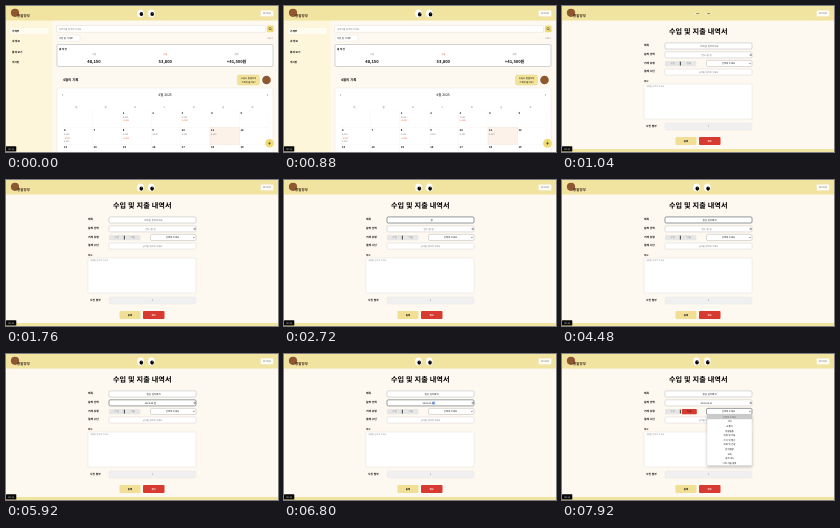
An HTML page that plays this animation: 272x146 px, repeating every 8 s.

```html
<!DOCTYPE html>
<html lang="ko">
<head>
<meta charset="utf-8">
<title>가계부</title>
<style>
html, body { margin: 0; width: 100%; height: 100%; overflow: hidden; background: #fdf8f0; }
svg { display: block; width: 100vw; height: 100vh; }
text { font-family: "Noto Sans CJK KR", "Noto Sans CJK", "Noto Sans", sans-serif; text-rendering: geometricPrecision; }
</style>
</head>
<body>
<svg id="stage" viewBox="0 0 272 146" preserveAspectRatio="none"></svg>
<script>
const LOOP = 8000;
const FORM_AT = 960;
const INK = '#0c0c0c', YELLOW = '#f1e3a0', RED = '#d63a30', LINE = '#c4c4c4', PALE = '#929292', COOKIE = '#8d5732';

const rect = (x, y, w, h, fill, stroke = 'none', r = 0, sw = 0.4) =>
  `<rect x="${x}" y="${y}" width="${w}" height="${h}" rx="${r}" fill="${fill}" stroke="${stroke}" stroke-width="${sw}"/>`;
const ellipse = (x, y, rx, ry, fill) => `<ellipse cx="${x}" cy="${y}" rx="${rx}" ry="${ry}" fill="${fill}"/>`;
const circle = (x, y, r, fill) => ellipse(x, y, r, r, fill);
// y is the vertical middle of the text
const label = (x, y, str, size, fill = INK, anchor = 'start', weight = 400, id = '') =>
  `<text ${id && `id="${id}"`} x="${x}" y="${y + size * 0.36}" font-size="${size}" fill="${fill}" text-anchor="${anchor}" font-weight="${weight}">${str}</text>`;
const mid = (x, y, str, size, fill, weight, id) => label(x, y, str, size, fill, 'middle', weight, id);
const path = (d, stroke = INK, sw = 0.4) => `<path d="${d}" fill="none" stroke="${stroke}" stroke-width="${sw}"/>`;
const during = (from, to, body) => `<g data-from="${from}" data-to="${to}">${body}</g>`;

function header() {
  const eye = x => `<g class="eye" data-x="${x}">${ellipse(0, 0, 3.3, 3.9, '#fff')}<g class="pupil">${ellipse(0, 0, 1.8, 2.1, '#000')}${circle(0.5, -0.8, 0.4, '#fff')}</g></g>`;
  return rect(0, 0, 272, 14.5, YELLOW)
    + circle(9, 6.8, 4.1, COOKIE) + label(11, 10, '콩알장부', 3.5, '#39251a', 'start', 900)
    + eye(134.5) + eye(145.3)
    + rect(254.5, 4.3, 13, 6.2, '#fffdf6', '#e7dcae', 1.2, 0.3) + mid(261, 7.4, '로그아웃', 2.2, '#444');
}

function calendar() {
  const left = 57, step = 29.4, top = 104, rowH = 17.3;
  const entries = { 1: 2, 3: 2, 6: 3, 8: 2, 9: 1, 10: 1, 11: 1 };
  let out = rect(51, 82, 216, 68, '#fff', '#e4dfd2', 2)
    + mid(159, 88.3, '4월 2025', 3.4, INK, 500)
    + label(56, 88.3, '‹', 4) + label(261, 88.3, '›', 4);
  [...'일월화수목금토'].forEach((day, i) => out += mid(left + step * (i + 0.45), 100.8, day, 2.3, '#777'));
  for (let cell = 0; cell < 21; cell++) {
    const x = left + cell % 7 * step, y = top + Math.floor(cell / 7) * rowH, date = cell - 1;
    const today = date === 11;
    out += rect(x, y, step, rowH, today ? '#fdf2e9' : 'none', today ? '#d9cfc6' : '#f5f3f0', 0, 0.25);
    if (date < 1) continue;
    out += label(x + 1, y + 2.8, date, 2.7, INK, 'start', 700);
    for (let i = 0; i < (entries[date] || 0); i++)
      out += label(x + 1, y + 7 + i * 3.5, i === 1 ? '-8,500' : '4,200', 2.2, i === 1 ? '#e0603c' : '#777');
  }
  return out;
}

function dashboard() {
  const menu = ['가계부', '내 정보', '통계 보기', '게시판'];
  const totals = [['수입', '48,150', '#777'], ['지출', '53,800', '#e0673c'], ['합계', '+41,500원', '#777']];
  return rect(0, 14, 46.5, 132, '#fef6da')
    + rect(4, 21.5, 39, 7, '#fffcf0', '#f3ead0', 1, 0.3)
    + menu.map((name, i) => label(6, 25 + i * 10.3, name, 2.6, INK, 'start', 800)).join('')
    + rect(50.5, 19.5, 209, 6.8, '#fff', '#d8d5cc', 1.2) + label(53, 22.7, '검색어를 입력해 주세요', 2.3, '#777')
    + rect(261, 19.5, 6.6, 6.8, '#f0d976', 'none', 1.2)
    + `<circle cx="264" cy="22.6" r="1.1" fill="none" stroke="#222" stroke-width=".4"/>` + path('M264.8 23.4l1.2 1.2')
    + rect(51, 29, 23, 6.2, '#fff', '#e6e1d6', 1) + label(53, 32.1, '이번 달 가계부', 2.3, INK, 'start', 500)
    + label(267, 32.1, '더보기', 2, '#777', 'end')
    + rect(51, 38.5, 216, 22, '#fff', '#8f949b', 1.4) + label(53, 43, '총 자산', 2.6, INK, 'start', 800)
    + totals.map(([name, sum, color], i) => mid(88 + i * 71.3, 48.5, name, 2.3, color) + mid(88 + i * 71.3, 55.2, sum, 4.1, INK, 700)).join('')
    + label(57, 73.7, '4월의 기록', 3.4, INK, 'start', 700)
    + rect(231.5, 69, 22, 10, '#f4e49a', '#e0cd78', 2)
    + mid(242.5, 72.3, '오늘도 알뜰하게', 2.3, INK, 500) + mid(242.5, 75.8, '기록해 볼까요?', 2.3, INK, 500)
    + circle(260.5, 74, 4.3, COOKIE)
    + calendar()
    + `<g id="add">${circle(0, 0, 4.2, '#f1da72')}${path('M-1.4 0h2.8M0-1.4v2.8', '#222', 0.5)}</g>`;
}

function dropdown() {
  const items = ['선택해 주세요', '식비', '교통비', '생활용품', '의류 및 미용', '주거 및 통신', '의료 및 건강', '문화생활', '교육', '경조사비', '기타 지출 항목'];
  return `<g filter="url(#shade)">${rect(145, 60.5, 45, 50.8, '#fff', '#bbb', 0, 0.3)}</g>`
    + rect(145, 60.5, 45, 4.7, '#c9c9c9')
    + items.map((name, i) => mid(167.5, 62.9 + i * 4.6, name, 2.3, i ? INK : '#666')).join('');
}

function form() {
  const names = [['제목', 39], ['날짜 선택', 48], ['거래 유형', 57], ['결제 수단', 65.5]];
  const field = (x, y, w, border = LINE) => rect(x, y, w, 6.1, '#fff', border, 1.3, 0.35);
  const focus = (x, y, w) => rect(x, y, w, 6.1, 'none', '#4c5a64', 1.3, 0.45);
  const kind = (x, name, fill, ink) => rect(x, 55, 15, 5.2, fill, 'none', 0.8) + mid(x + 7.5, 57.6, name, 2.4, ink);
  return mid(136.2, 25.5, '수입 및 지출 내역서', 7.15, '#000', 700)
    + names.map(([name, y]) => label(82, y, name, 2.7, INK, 'start', 900)).join('')
    + field(103, 36.9, 87, '#8d969e') + mid(147.5, 40, '', 2.4, INK, 500, 'subject')
    + field(103, 45.8, 87, '#aaa')
    + during(6480, 7040, rect(148.3, 47.5, 2.9, 3, '#8fbaf0'))
    + mid(144.5, 49, '', 2.3, INK, 400, 'date')
    + rect(188, 48.2, 1.4, 1.4, 'none', '#333', 0.2, 0.4)
    + kind(103, '수입', '#e6e6e6', '#888')
    + during(0, 7200, kind(119.3, '지출', '#e6e6e6', '#888'))
    + during(7200, LOOP, kind(119.8, '지출', RED, '#1c0d0b'))
    + rect(117.9, 55.6, 0.8, 4, '#111')
    + field(144.5, 54.4, 45.5, '#999') + mid(166.5, 57.5, '선택해 주세요', 2.3, INK, 500)
    + path('M187 57l.9.9.9-.9')
    + field(103, 63, 87) + mid(146.5, 66.1, '금액을 입력해 주세요', 2.2, '#777')
    + label(82, 75, '메모', 2.4, '#4a382c', 'start', 700)
    + rect(82, 78, 108, 35, '#fff', '#d9d6d0', 0.8, 0.35) + label(84, 80.2, '내용을 입력해 주세요', 2.1, PALE)
    + label(84, 120.3, '사진 첨부', 2.7, INK, 'start', 800)
    + rect(103, 117, 87, 7, '#f0f0f0', '#e2e2e2', 1, 0.3) + mid(146.5, 120.5, '+', 2.6, '#333')
    + rect(113.5, 131, 21, 8, '#f0df94', 'none', 1) + mid(124, 135, '등록', 2.4, INK, 600)
    + rect(137, 131, 21.5, 8, RED, 'none', 1) + mid(147.8, 135, '취소', 2.4, '#fff', 600)
    + rect(0, 143, 272, 3, YELLOW)
    + during(1840, 5760, focus(103, 36.9, 87))
    + during(5760, 7120, focus(103, 45.8, 87))
    + during(7840, LOOP, focus(144.5, 54.4, 45.5))
    + during(7920, LOOP, dropdown());
}

const stage = document.getElementById('stage');
stage.innerHTML = '<defs><filter id="shade" x="-20%" y="-20%" width="140%" height="150%"><feDropShadow dx="0" dy="1.5" stdDeviation="1.6" flood-opacity=".22"/></filter></defs>'
  + rect(0, 0, 272, 146, '#fdf8f0')
  + during(0, FORM_AT, dashboard())
  + during(FORM_AT, LOOP, form())
  + header()
  + rect(0, 140.2, 10.3, 5.3, '#080808', 'none', 0.6) + mid(5.1, 142.9, '00:12', 2.3, '#eee');

const timed = [...stage.querySelectorAll('[data-from]')];
const eyes = [...stage.querySelectorAll('.eye')];
const [subject, date, add] = ['subject', 'date', 'add'].map(id => document.getElementById(id));

// Each syllable is composed from its partial jamo
const syllables = ['ㅈ저점', 'ㅅ시심', ' ', 'ㄱ기김', 'ㅊ치', 'ㅉ찌', 'ㄱ개'];
const typed = [];
let done = '';
for (const parts of syllables) {
  for (const part of parts) typed.push(done + part);
  done += parts.at(-1);
}
const TYPE_AT = 2480, TYPE_STEP = 120;

// Time, then horizontal and vertical pupil offset
const gaze = [[0, 0.9, 0.6], [880, 1.2, 1], [1760, 0.8, 1.2], [5680, 0.8, 1.2], [6400, 0.7, 1.2], [7040, 0.7, 1.2], [7840, 0.5, 1], [8000, 0.5, 1]];

function gazeAt(t) {
  const i = Math.max(1, gaze.findIndex(key => key[0] > t));
  const [a, b] = [gaze[i - 1], gaze[i]];
  const k = (t - a[0]) / (b[0] - a[0]);
  const e = k * k * (3 - 2 * k);
  return [a[1] + (b[1] - a[1]) * e, a[2] + (b[2] - a[2]) * e];
}

function setText(node, str, fill) {
  if (node.textContent !== str) node.textContent = str;
  node.setAttribute('fill', fill);
}

function render(t) {
  for (const node of timed) node.style.display = t >= +node.dataset.from && t < +node.dataset.to ? '' : 'none';

  const [gx, gy] = gazeAt(t);
  const fromBlink = Math.abs((t - 1040 + 6000) % 4000 - 2000);
  const open = Math.min(1, 0.1 + 0.9 * Math.max(0, fromBlink - 30) / 130);
  for (const eye of eyes) {
    eye.setAttribute('transform', `translate(${eye.dataset.x} 7.4) scale(1 ${open})`);
    eye.lastChild.setAttribute('transform', `translate(${gx} ${gy})`);
  }

  const step = Math.floor((t - TYPE_AT) / TYPE_STEP);
  if (step < 0) setText(subject, '제목을 입력하세요', '#666');
  else setText(subject, typed[Math.min(step, typed.length - 1)], INK);
  setText(date, t < 5760 ? '연도-월-일' : t < 6560 ? '2025-04-일' : '2025-04-11', t < 5760 ? '#777' : INK);

  const hover = Math.min(1, Math.max(0, (t - 640) / 200));
  add.setAttribute('transform', `translate(263.5 137.3) scale(${1 + 0.06 * hover})`);
}

function tick(now) {
  render(now % LOOP);
  requestAnimationFrame(tick);
}
render(0);
requestAnimationFrame(tick);
</script>
</body>
</html>
```
